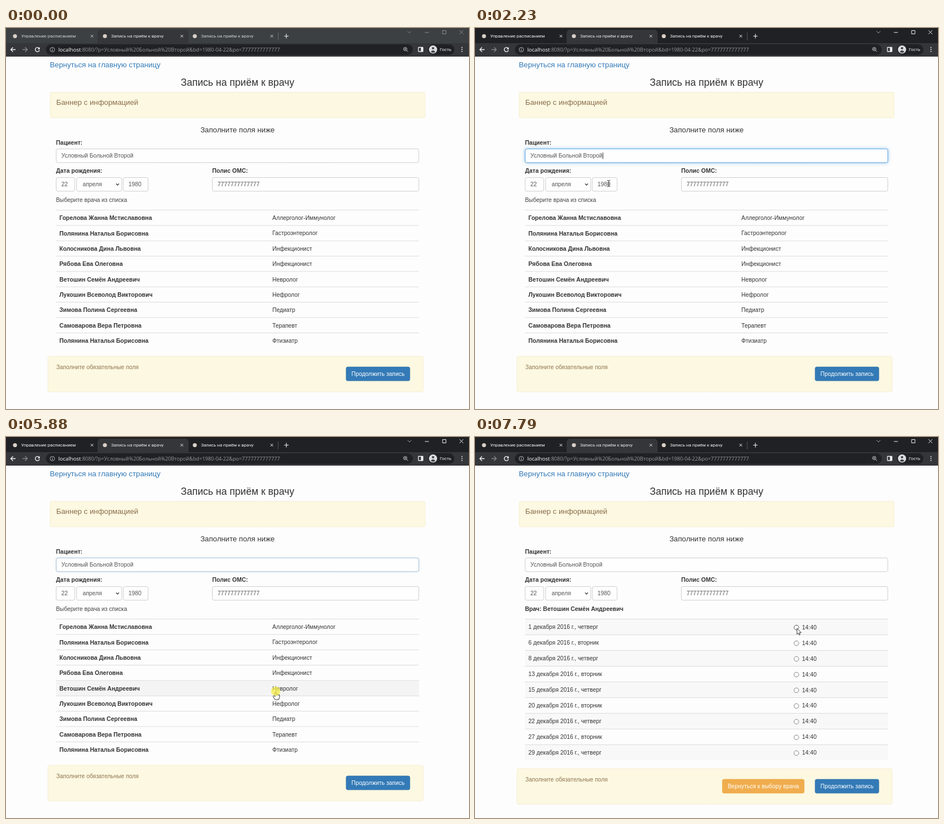
Write an HTML page with a canvas that moves like this. It is 824 px wide and 679 px high and loops after 8000 ms.

```html
<!DOCTYPE html>
<html lang="ru">
<head>
<meta charset="utf-8">
<title>Запись на приём к врачу</title>
<style>
html, body { margin: 0; width: 100%; height: 100%; overflow: hidden; background: #fdfdfd; }
canvas { display: block; }
</style>
</head>
<body>
<canvas id="stage" width="824" height="679"></canvas>
<script>
const ctx = document.getElementById('stage').getContext('2d');
const LOOP = 8000, START = 320, TICK = 111.4;
const SANS = '"Liberation Sans", Arial, sans-serif';
const UI = '"Open Sans", "Noto Sans", sans-serif';
const TOP = 324.5, LEFT = 89, RIGHT = 735;
const PATIENT = 'Условный Больной Второй', POLICY = '7777777777777';
const PICKED = 'Ветошин Семён Андреевич';

const doctors = [
  ['Горелова Жанна Мстиславовна', 'Аллерголог-Иммунолог'],
  ['Полянина Наталья Борисовна', 'Гастроэнтеролог'],
  ['Колосникова Дина Львовна', 'Инфекционист'],
  ['Рябова Ева Олеговна', 'Инфекционист'],
  [PICKED, 'Невролог'],
  ['Лукошин Всеволод Викторович', 'Нефролог'],
  ['Зимова Полина Сергеевна', 'Педиатр'],
  ['Самоварова Вера Петровна', 'Терапевт'],
  ['Полянина Наталья Борисовна', 'Фтизиатр']
];
const days = [1, 6, 8, 13, 15, 20, 22, 27, 29];

// Pointer moves: first tick, last tick, from, to, sideways bow
const moves = [
  [0, 7, 596, 334, 276, 222, 0],
  [9, 15, 276, 222, 238, 277, 0],
  [20, 25, 238, 277, 480, 275, 0],
  [31, 41, 480, 275, 480, 453, 13],
  [55, 67, 480, 453, 573, 341, 3]
];
const caretOn = [[8, 13], [17, 22], [27, 32], [37, 41], [45, 50]];

function text(s, x, y, size, color, { bold, font = SANS, align = 'left' } = {}) {
  ctx.font = `${bold ? 'bold ' : ''}${size}px ${font}`;
  ctx.textAlign = align;
  ctx.fillStyle = color;
  ctx.fillText(s, x, y + size * 0.35);
}

function rect(x, y, w, h, color) {
  ctx.fillStyle = color;
  ctx.fillRect(x, y, w, h);
}

function box(x, y, w, h, r, fill, stroke, width = 0.8) {
  ctx.beginPath();
  ctx.roundRect(x, y, w, h, r);
  if (fill) { ctx.fillStyle = fill; ctx.fill(); }
  if (stroke) { ctx.strokeStyle = stroke; ctx.lineWidth = width; ctx.stroke(); }
}

function circle(x, y, r, fill, stroke, width = 0.8) {
  box(x - r, y - r, 2 * r, 2 * r, r, fill, stroke, width);
}

function path(d, x, y, stroke, width = 1, fill) {
  const p = new Path2D(d);
  ctx.save();
  ctx.translate(x, y);
  ctx.lineJoin = 'round';
  if (fill) { ctx.fillStyle = fill; ctx.fill(p); }
  ctx.strokeStyle = stroke;
  ctx.lineWidth = width;
  ctx.stroke(p);
  ctx.restore();
}

function tab(x, title, color) {
  circle(x + 16, 14.5, 3.6, '#d8cfc6');
  text(title, x + 27, 14.5, 8, color, { font: 'Roboto, sans-serif' });
  path('M-2.3-2.3L2.3 2.3M2.3-2.3L-2.3 2.3', x + 153, 14.5, color);
}

function drawBrowser(active) {
  const label = active ? '#f4f5f6' : '#cfd1d4';
  rect(0, 0, 824, 28, active ? '#202124' : '#3c4043');
  box(163, 3, 162, 30, 6, '#35363a');
  rect(0, 27, 824, 24, '#35363a');
  tab(0, 'Управление расписанием', label);
  tab(160, 'Запись на приём к врачу', '#e8eaed');
  tab(320, 'Запись на приём к врачу', label);
  rect(484, 8, 0.8, 14, active ? '#5f6368' : '#75787c');
  path('M-4 0H4M0-4V4', 499, 14.5, '#e8eaed', 1.2);

  const ctl = active ? '#f1f1f1' : '#8c8e91';
  path('M-3.5-2L0 1.5L3.5-2', 718, 7.5, active ? '#a0a1a3' : '#7b7d81');
  path('M-3.5 0H3.5', 749, 8, ctl);
  path('M-3-3H3V3H-3Z', 780, 7.5, ctl);
  path('M-3.3-3.3L3.3 3.3M3.3-3.3L-3.3 3.3', 810.5, 7.5, ctl);

  const arrow = 'M4.5 0H-4M0-4L-4 0L0 4';
  path(arrow, 12.5, 38.5, '#f1f3f4', 1.4);
  ctx.save();
  ctx.translate(34, 38.5);
  ctx.scale(-1, 1);
  path(arrow, 0, 0, '#85878a', 1.3);
  ctx.restore();
  path('M3.6 1A3.8 3.8 0 1 1 2.7-2.7', 56, 38.5, '#f1f3f4', 1.4);
  path('M4-4.2V-.6H.4Z', 56, 38.5, '#f1f3f4', 0.2, '#f1f3f4');

  box(71, 29, 653, 19, 9.5, '#202124');
  circle(82.5, 38.5, 4, null, '#c6c8cb', 0.9);
  path('M0-2.3V-1.2M0-.3V2.3', 82.5, 38.5, '#c6c8cb');
  const host = 'localhost';
  text(host, 93, 38.3, 9.6, '#fff', { font: UI });
  const w = ctx.measureText(host).width;
  text(`:8080/?p=${PATIENT.replaceAll(' ', '%20')}&bd=1980-04-22&po=${POLICY}`,
    93 + w, 38.3, 9.15, '#969a9f', { font: UI });
  circle(710.5, 37.5, 3, null, '#d5d7da', 1);
  path('M2.2 2.2L5 5M-1.4 0H1.4M0-1.4V1.4', 710.5, 37.5, '#d5d7da', 0.9);

  box(734, 34.5, 8, 7.5, 0.5, null, '#f1f3f4', 1.3);
  rect(738.5, 34.5, 3.5, 7.5, '#f1f3f4');
  box(751, 29, 47, 19, 9.5, '#202124');
  circle(760, 38.3, 7.3, '#dadce0');
  circle(760, 36, 2.1, '#3c4043');
  path('M-4 4.3Q0-.7 4 4.3Q0 7 -4 4.3Z', 760, 38.3, '#3c4043', 0.3, '#3c4043');
  text('Гость', 772, 38.4, 8, '#f1f3f4', { font: 'Roboto, sans-serif' });
  for (const y of [34.8, 38.3, 41.8]) circle(811.5, y, 1, '#e8eaed');
}

function field(x, y, w, value, pad = 9.5) {
  box(x + 0.3, y, w, 24.4, 3, '#fefefe', '#c9c9c9', 0.9);
  text(value, x + pad, y + 12.3, 10.35, '#555');
}

function button(x, y, w, label, fill, edge) {
  box(x + 0.3, y, w, 24.8, 3, fill, edge, 0.7);
  text(label, x + w / 2 + 0.3, y + 12.7, 10.35, '#fff', { align: 'center' });
}

function drawForm(focus, caret) {
  text('Вернуться на главную страницу', 78, 65, 13.25, '#337ab7');
  text('Запись на приём к врачу', 412, 97, 17.6, '#333', { align: 'center' });
  box(78.5, 114.5, 667.5, 45.5, 3, '#fcf8e1', '#f8ebcd');
  text('Баннер с информацией', 89.5, 132.5, 13.25, '#8a6d4b');
  text('Заполните поля ниже', 412, 181.5, 13.2, '#333', { align: 'center' });
  text('Пациент:', LEFT, 204.3, 10.5, '#333', { bold: true });
  text('Дата рождения:', LEFT, 254.7, 10.5, '#333', { bold: true });
  text('Полис ОМС:', 367, 254.7, 10.5, '#333', { bold: true });

  if (focus) {
    ctx.save();
    ctx.shadowColor = `rgba(102,175,233,${0.75 * focus * focus})`;
    ctx.shadowBlur = 6;
    box(LEFT, 215.2, 646, 25, 3, '#fff');
    ctx.restore();
  }
  field(LEFT, 215.5, 645.4, PATIENT);
  if (focus) box(LEFT + 0.3, 215.5, 645.4, 24.4, 3, null, `rgba(102,175,233,${focus})`, 1);
  if (caret) rect(227.2, 222, 1, 11.5, '#333');

  field(LEFT, 266.5, 33, '22');
  field(125.4, 266.5, 80.3, 'апреля', 11);
  path('M-2.6-1.3L0 1.3L2.6-1.3', 198.5, 278.7, '#333', 1.3);
  field(208.6, 266.5, 44, '1980');
  field(367, 266.5, 367.4, POLICY);
}

function drawFooter(y) {
  box(74.5, y, 668, 63.5, 3, '#fcf8e1', '#f8ebcd');
  text('Заполните обязательные поля', 89.5, y + 19.2, 10.3, '#8f7550');
  button(605, y + 19, 113.5, 'Продолжить запись', '#337ab7', '#2e6da4');
}

function drawDoctors(hover) {
  text('Выберите врача из списка', LEFT, 306.5, 10.3, '#444');
  doctors.forEach(([name, job], i) => {
    const y = TOP + i * 27.35;
    if (i === hover) rect(LEFT, y, RIGHT - LEFT, 27.35, '#f4f4f4');
    rect(LEFT, y - 0.4, RIGHT - LEFT, 0.9, '#d9d9d9');
    text(name, 95, y + 14, 10.5, '#333', { bold: true });
    text(job, 474, y + 14, 10.35, '#333');
  });
  drawFooter(585);
}

function drawSlots(radioHover) {
  text('Врач: ' + PICKED, LEFT, 306.5, 10.5, '#333', { bold: true });
  days.forEach((day, i) => {
    const y = TOP + i * 27.97;
    if (i % 2 === 0) rect(LEFT, y, RIGHT - LEFT, 27.97, '#f8f8f8');
    rect(LEFT, y - 0.4, RIGHT - LEFT, 0.9, '#d9d9d9');
    text(`${day} декабря 2016 г., ${i % 2 ? 'вторник' : 'четверг'}`, 95, y + 14, 10.35, '#333');
    circle(572, y + 15, 4.2, '#fff', radioHover && !i ? '#3f3f3f' : '#767676', 0.9);
    text('14:40', 582, y + 14.5, 10.35, '#333');
  });
  drawFooter(591);
  button(440, 610, 145.5, 'Вернуться к выбору врача', '#f0ad4e', '#eea236');
}

function pointerAt(k) {
  let m = moves[0];
  for (const next of moves) if (k >= next[0]) m = next;
  const [a, b, x0, y0, x1, y1, bow] = m;
  const p = 1 - (1 - Math.min(1, (k - a) / (b - a))) ** 1.85;
  return [x0 + (x1 - x0) * p - bow * 4 * p * (1 - p), y0 + (y1 - y0) * p];
}

function drawPointer(kind, x, y) {
  if (kind === 'beam') {
    const beam = 'M-2.5-5.5H-.6M.6-5.5H2.5M0-5V5M-2.5 5.5H-.6M.6 5.5H2.5';
    path(beam, x, y, '#fff', 2);
    path(beam, x, y, '#111', 1);
  } else if (kind === 'hand') {
    path('M-1.2 1Q0-.9 1.2 1V5.2Q2.4 4.4 3.3 5.6Q4.5 4.9 5.2 6.1Q6.8 5.8 6.8 7.4V10.6L5.4 15H-1.4L-4.5 9.6Q-4.6 7.6-2.8 8.2L-1.2 9.8Z',
      x, y, '#222', 0.9, '#fff');
    path('M1.2 5V8M3.3 5.6V8.2M5.2 6.2V8.4', x, y, '#333', 0.7);
  } else {
    path('M0 0V10.6L2.4 8.4L4 12L5.6 11.3L4.1 7.8H7.5Z', x, y, '#222', 0.9, '#fff');
  }
}

const inside = (x, y, l, t, r, b) => x >= l && x < r && y >= t && y < b;
const overField = (x, y) =>
  inside(x, y, 89, 215, 735, 241) || inside(x, y, 89, 266, 122, 292) ||
  inside(x, y, 208, 266, 253, 292) || inside(x, y, 367, 266, 735, 292);

function draw(t) {
  const k = Math.floor((t - START) / TICK + 0.12);
  const [x, y] = pointerAt(k);
  const visible = k >= 0, slots = k >= 51, click = k === 8 || k === 50;
  const overRow = visible && !slots && inside(x, y, LEFT, TOP, RIGHT, TOP + 9 * 27.35);
  const focus = k < 8 || slots ? 0 : click ? 0.4 : 1;
  const caret = caretOn.some(([a, b]) => k >= a && k < b);

  rect(0, 0, 824, 679, '#fdfdfd');
  drawBrowser(k >= 8);
  drawForm(focus, caret);
  if (slots) drawSlots(k >= 66);
  else drawDoctors(overRow ? Math.floor((y - TOP) / 27.35) : -1);

  if (visible) drawPointer(overField(x, y) ? 'beam' : overRow ? 'hand' : 'arrow', x, y);
  if (click) circle(x, y, 8.3, 'rgba(247,238,70,.72)');
}

const begin = performance.now();
function frame() {
  draw((performance.now() - begin) % LOOP);
  requestAnimationFrame(frame);
}
frame();
</script>
</body>
</html>
```
